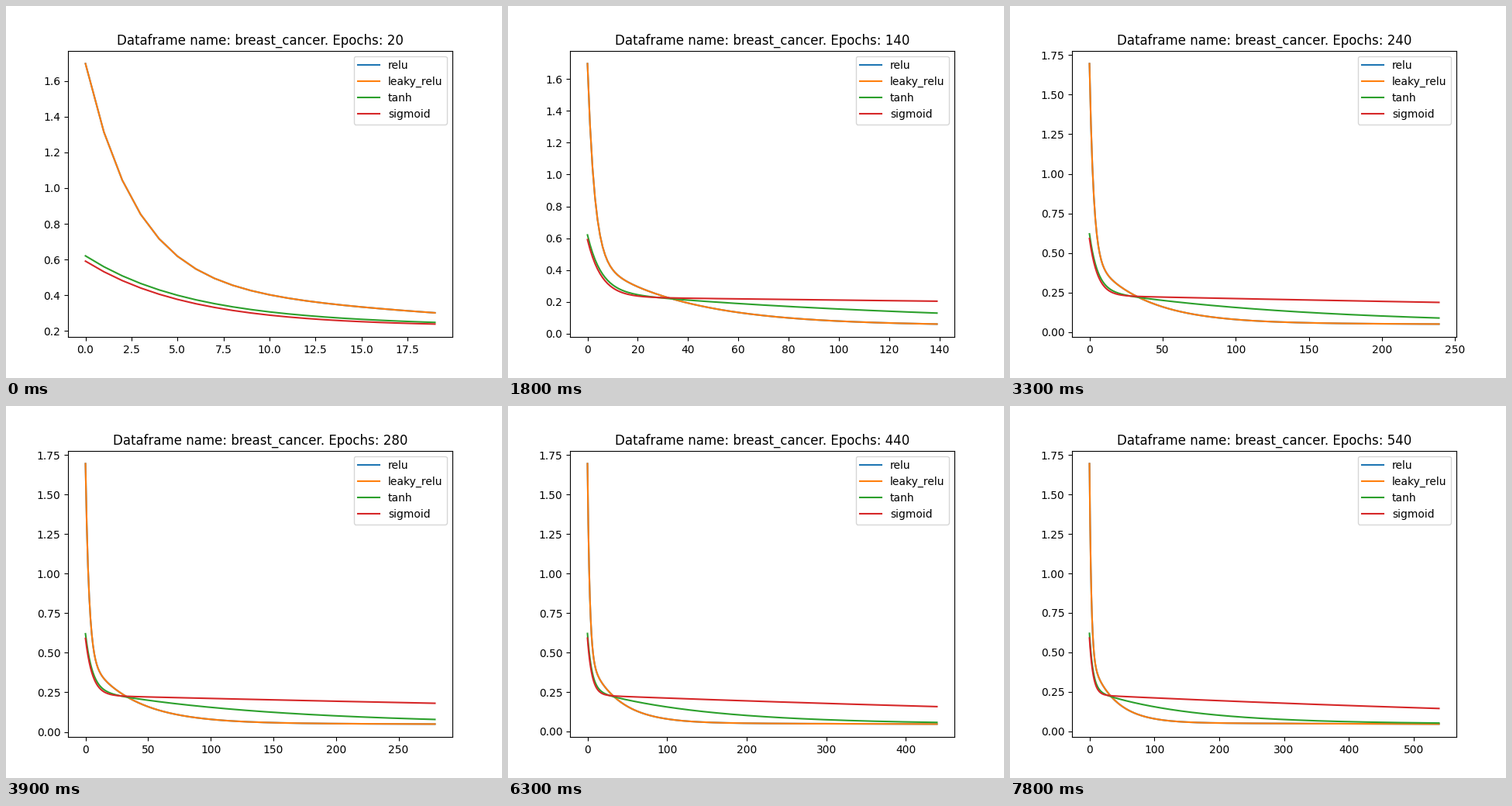
A matplotlib script for the animation above (8 s loop, 640 by 480 pixels).

```python
import numpy as np
import matplotlib.pyplot as plt
from matplotlib.animation import FuncAnimation

INTERVAL = 100          # ms per frame
FRAMES = 80             # 8 s loop
FRAMES_PER_STEP = 3     # the plot changes every 300 ms
EPOCHS_PER_STEP = 20
EPOCHS = np.arange(540)


def decay(*terms):
    """Loss curve as a sum of exponentials, each (amplitude, time constant)."""
    return sum(amp * np.exp(-EPOCHS / tau) for amp, tau in terms)


relu = decay((1.228, 2.78), (0.4145, 36.8), (0.0535, 3400))
losses = {
    "relu": relu,
    "leaky_relu": relu,
    "tanh": decay((0.3565, 5.5), (0.006, 60), (0.2115, 148), (0.0465, np.inf)),
    "sigmoid": decay((0.3603, 5.59), (0.2307, 1150)),
}

fig, ax = plt.subplots(figsize=(6.4, 4.8), dpi=100)
lines = {name: ax.plot([], [], label=name)[0] for name in losses}
ax.legend(loc="upper right")


def update(frame):
    count = EPOCHS_PER_STEP * (frame // FRAMES_PER_STEP + 1)
    for name, line in lines.items():
        line.set_data(EPOCHS[:count], losses[name][:count])
    ax.relim()
    ax.autoscale_view()
    ax.set_title(f"Dataframe name: breast_cancer. Epochs: {count}")
    return list(lines.values())


anim = FuncAnimation(fig, update, frames=FRAMES, interval=INTERVAL,
                     repeat=True, repeat_delay=0, blit=False)
plt.show()
```
